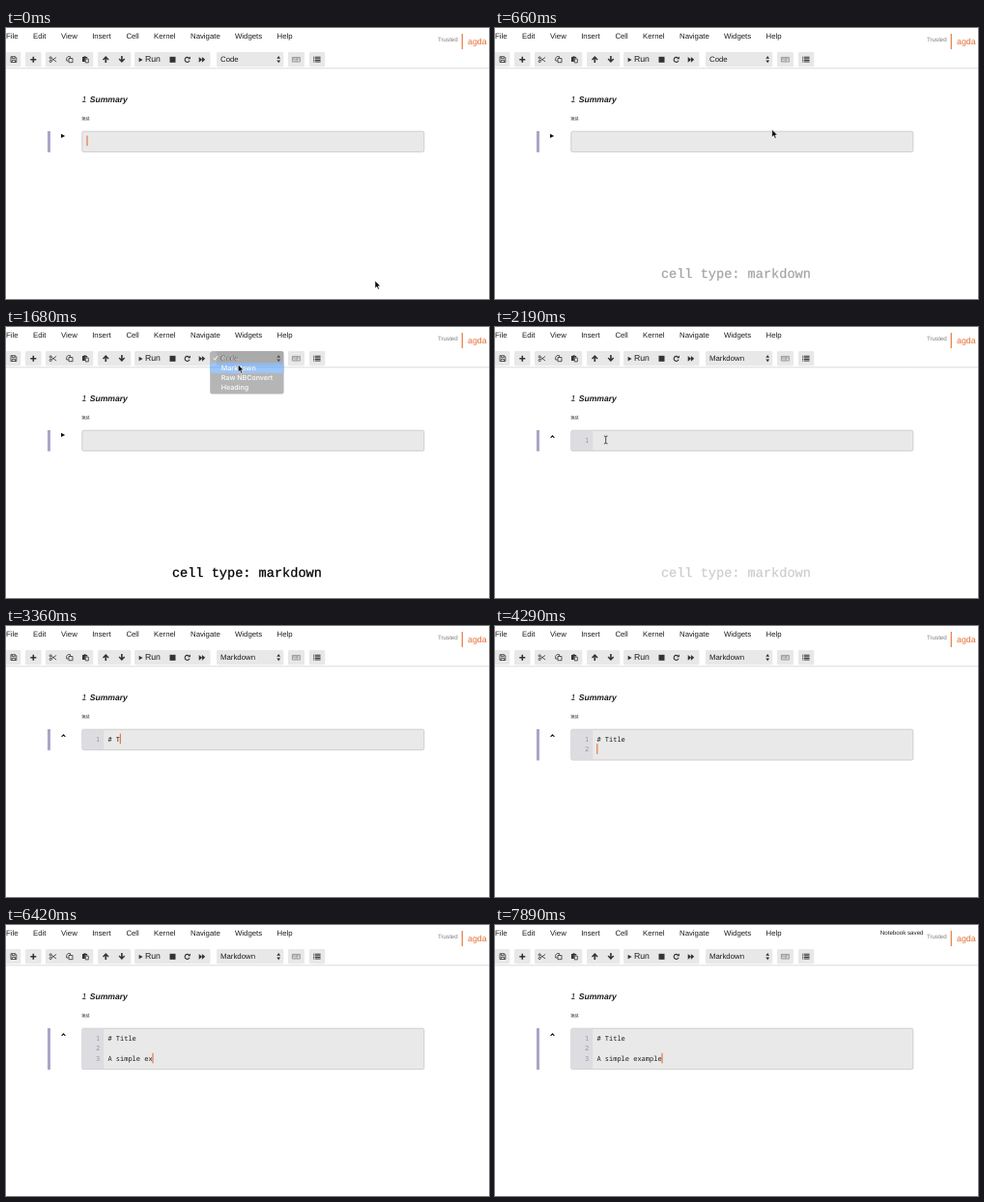
Animation, 500 px wide and 281 px high, one loop 8000 ms. Source, as an HTML page:

```html
<!DOCTYPE html>
<html lang="en">
<head>
<meta charset="utf-8">
<title>Notebook cell demo</title>
<style>
html, body { margin: 0; width: 100%; height: 100%; overflow: hidden; background: #fff; }
svg { display: block; width: 100%; height: 100%; }
text { font-family: "Liberation Sans", Arial, sans-serif; font-size: 7.8px; fill: #1c1c1c; white-space: pre; text-rendering: geometricPrecision; }
.mono { font-family: "Noto Sans Mono", "DejaVu Sans Mono", monospace; font-size: 7px; }
.num { fill: #96969c; text-anchor: end; }
.caption { font-family: "Courier New", "Liberation Mono", monospace; font-size: 13.6px; fill: #000; stroke: #000; stroke-width: .25; }
.item { font-family: Inter, "Open Sans", sans-serif; font-size: 7.1px; font-weight: 500; fill: #fff; }
.line { fill: none; stroke: #333; stroke-width: .8; }
.button { fill: #e8e8e8; }
</style>
</head>
<body>
<svg viewBox="0 0 500 281" preserveAspectRatio="none">
  <defs>
    <linearGradient id="shade" x2="0" y2="1">
      <stop offset="0" stop-color="#dedede"/>
      <stop offset="1" stop-color="#fff"/>
    </linearGradient>
  </defs>
  <rect width="500" height="281" fill="#fff"/>
  <rect y="41" width="500" height="2.2" fill="url(#shade)"/>
  <g id="menubar"></g>
  <text id="saved" x="398.8" y="10.3" style="font-size:6.2px">Notebook saved</text>
  <text x="447" y="14" style="font-size:6.2px;fill:#7d7d7d">Trusted</text>
  <rect x="471.7" y="6" width="1.1" height="16" fill="#e46e2e"/>
  <text x="478" y="17" style="font-size:8.8px;fill:#e46e2e">agda</text>

  <g id="buttons"></g>
  <g id="icons" fill="#333">
    <path class="line" d="M5 29.7h4.6l1.2 1.2v4.6H5zM6.4 29.8v1.9h2.8v-1.9M6.2 35.4v-2h3.4v2"/>
    <path d="M27.5 29.7h1.6v2.2h2.2v1.6h-2.2v2.2h-1.6v-2.2h-2.2v-1.6h2.2z"/>
    <g class="line" stroke-width=".7">
      <path d="M47.2 31.4l4.9 3.5M47.2 33.9l4.9-3.5"/>
      <circle cx="46.2" cy="30.9" r="1.1"/>
      <circle cx="46.2" cy="34.5" r="1.1"/>
      <path d="M65 31.5h4v4.2h-4zM64.8 34h-2.1v-2.8l1.4-1.6h2.5v1.7"/>
    </g>
    <path d="M79 30h1.6v-.8h2V30h1.6v1.6h-2.4V35H79z"/>
    <path class="line" d="M82.3 32.1h3v3.8h-3z"/>
    <path id="arrow" d="M103.3 29l3.3 3.4-1 1-1.5-1.5v4h-1.6v-4l-1.5 1.5-1-1z"/>
    <use href="#arrow" transform="rotate(180 111.6 32.5)"/>
    <path d="M137.6 30.8l4 2.2-4 2.2z"/>
    <rect x="169.5" y="29.8" width="6" height="6"/>
    <path class="line" style="stroke-width:1.1" d="M189.4 31.1a2.5 2.5 0 1 0 .6 2.7"/>
    <path d="M190.9 29.4v2.9h-2.9z"/>
    <path d="M199.7 29.9l3.2 2.8v-2.8l3.3 2.9-3.3 2.9v-2.8l-3.2 2.8z"/>
    <path d="M280.3 31.7l1.9-2.8 1.9 2.8zM280.3 33.5l1.9 2.8 1.9-2.8z"/>
    <path class="line" style="stroke:#666;stroke-width:.6" d="M296.4 30.4h8v4.6h-8z"/>
    <path class="line" style="stroke:#666;stroke-width:.7" stroke-dasharray=".8 .5" d="M297.3 31.6h6.3M297.3 32.7h6.3M298.5 33.9h4"/>
    <path class="line" style="stroke-width:1" d="M318.2 30.2h1.1M320 30.2h5.6M318.2 31.8h1.1M320 31.8h5.6M318.2 33.4h1.1M320 33.4h5.6M318.2 35h1.1M320 35h5.6"/>
  </g>
  <text x="144" y="35.4" style="font-size:8.7px">Run</text>
  <text id="kind" x="222" y="35.2"></text>

  <text x="78.4" y="76.5" style="font-size:8.8px;font-style:italic">1</text>
  <text x="86.7" y="76.5" style="font-size:8.6px;font-style:italic;font-weight:bold">Summary</text>
  <text x="78.5" y="94.9" style="font-size:4.9px">test</text>
  <rect x="78.5" y="95.2" width="8" height=".5" fill="#777"/>

  <rect id="bar" x="43" y="107" width="3" fill="#aaa5c9"/>
  <rect id="cell" x="78.8" y="107.2" width="354" rx="1.5" fill="#e9e9e9" stroke="#c6c6c6" stroke-width=".8"/>
  <rect id="gutter" x="79.2" y="107.6" width="22" fill="#dcdce1"/>
  <path id="play" d="M57 109.7l4.2 2.2-4.2 2.2z" fill="#111"/>
  <path id="fold" d="M57.6 114.8l1.9-1.9 1.9 1.9" fill="none" stroke="#111" stroke-width="1.1"/>
  <g id="lines"></g>
  <rect id="caret" width="1.2" height="10.6" fill="#e37a45"/>

  <text id="caption" class="caption" x="171.9" y="259.3">cell type: markdown</text>

  <g id="menu">
    <rect x="211.2" y="25" width="76.4" height="44.6" rx="2.5" fill="#6d6d6d"/>
    <rect id="hover" x="211.2" width="76.4" height="10.6" fill="#3b8df5"/>
    <path d="M214.8 32.2l1.5 1.9 2.7-4.2" fill="none" stroke="#fff" stroke-width="1"/>
    <g id="items"></g>
  </g>

  <path id="pointer" d="M0 0v7.9l1.8-1.7 1.3 2.9 1.4-.6-1.3-2.8h2.5z" fill="#000" stroke="#fff" stroke-width=".6"/>
  <path id="beam" d="M-1.8-4q1.8 0 1.8 1.2v5.6q0 1.2-1.8 1.2M1.8-4q-1.8 0-1.8 1.2M0 2.8q0 1.2 1.8 1.2" fill="none" stroke="#222" stroke-width=".8"/>
</svg>
<script>
const LOOP = 8000, BLINK = 490, CHAR = 4.2, ROW = 10.6;
const FOCUS = 2520, SWITCH = 1830;
const NOTE = "# Title\n\nA simple example";
const KEYS = [3110, 3205, 3355, 3535, 3625, 3715, 3805, 4255, 4400,
  5215, 5275, 5425, 5515, 5605, 5965, 6055, 6145, 6235, 6325, 6385,
  6505, 6655, 6775, 6835, 6905];
// time, x, y of the mouse
const PATH = [[210, 382, 262], [930, 243, 33.5], [1050, 242.2, 36.8],
  [1250, 241, 41], [1560, 240.3, 39], [1830, 240.3, 39], [2130, 114.7, 117]];

const $ = id => document.getElementById(id);
const clamp = v => Math.min(1, Math.max(0, v));
const ramp = (t, a, b) => clamp((t - a) / (b - a));
const ease = u => u * u * (3 - 2 * u);
const show = (id, on) => $(id).setAttribute("visibility", on ? "visible" : "hidden");
const fade = (id, v) => $(id).setAttribute("opacity", v);
const set = (id, attrs) => { for (const k in attrs) $(id).setAttribute(k, attrs[k]); };

function add(parent, tag, attrs, label = "") {
  const el = document.createElementNS("http://www.w3.org/2000/svg", tag);
  for (const k in attrs) el.setAttribute(k, attrs[k]);
  el.textContent = label;
  $(parent).append(el);
  return el;
}

[["File", 0], ["Edit", 28], ["View", 57], ["Insert", 89.2], ["Cell", 124.4],
 ["Kernel", 153], ["Navigate", 191], ["Widgets", 237], ["Help", 280.5]]
  .forEach(([name, x]) => add("menubar", "text", { x, y: 11.2 }, name));

[[-2, 15.3], [20, 36.5], [41, 90.3], [95, 129.3], [133, 211.5], [218, 287.3], [292, 309], [314, 330.3]]
  .forEach(([a, b]) => add("buttons", "rect", { class: "button", x: a, y: 25, width: b - a, height: 15.3, rx: 1.4 }));

["Code", "Markdown", "Raw NBConvert", "Heading"]
  .forEach((name, i) => add("items", "text", { class: "item", x: 222.8, y: 34.6 + i * 10 }, name));

const rows = [0, 1, 2].map(i => {
  const y = 119.6 + i * ROW;
  return {
    num: add("lines", "text", { class: "mono num", x: 97.2, y }, i + 1),
    code: add("lines", "text", { class: "mono", x: 105.4, y })
  };
});

function mouseAt(t) {
  let [, x, y] = PATH[0];
  for (let i = 1; i < PATH.length; i++) {
    const [t0, x0, y0] = PATH[i - 1], [t1, x1, y1] = PATH[i];
    if (t < t0) break;
    const u = ease(ramp(t, t0, t1));
    x = x0 + (x1 - x0) * u;
    y = y0 + (y1 - y0) * u;
  }
  return [x, y];
}

function drawCell(t) {
  const markdown = t >= SWITCH;
  const typed = NOTE.slice(0, KEYS.filter(k => k <= t).length).split("\n");
  const height = 21.2 + (typed.length - 1) * ROW;
  set("bar", { height: height + .6 });
  set("cell", { height });
  set("gutter", { height: height - .8 });
  show("gutter", markdown);
  show("play", !markdown);
  show("fold", markdown);
  rows.forEach(({ num, code }, i) => {
    num.style.display = markdown && i < typed.length ? "" : "none";
    code.textContent = typed[i] || "";
  });

  const last = [FOCUS, ...KEYS].filter(k => k <= t).pop();
  const lit = last ? Math.floor((t - last) / BLINK) % 2 === 0 : t < 430;
  const row = typed.length - 1;
  set("caret", {
    x: markdown ? 105.2 + typed[row].length * CHAR : 83.4,
    y: 111.6 + row * ROW
  });
  show("caret", lit);
}

function drawMenu(t) {
  show("menu", t >= 1020 && t < 1800);
  fade("menu", .97 * (1 - ramp(t, 1580, 1790)));
  set("hover", { y: t < 1080 ? 26.4 : 37.2 });
  show("hover", t >= 1020 && t < 1800 && !(t >= 1470 && t < 1530));
  $("kind").textContent = t < 1770 ? "Code" : "Markdown";
}

function drawMouse(t) {
  const [x, y] = mouseAt(t);
  const overText = t > SWITCH && y > 107 && y < 129;
  const place = { transform: `translate(${x} ${y})` };
  set("pointer", place);
  set("beam", place);
  show("pointer", !overText);
  show("beam", overText && t < KEYS[0]);
}

function draw(t) {
  drawCell(t);
  drawMenu(t);
  drawMouse(t);
  fade("caption", ramp(t, 480, 990) * (1 - ramp(t, 1830, 2280)));
  fade("saved", ramp(t, 6660, 6890));
}

const start = performance.now();
function tick() {
  draw((performance.now() - start) % LOOP);
  requestAnimationFrame(tick);
}
tick();
</script>
</body>
</html>
```
